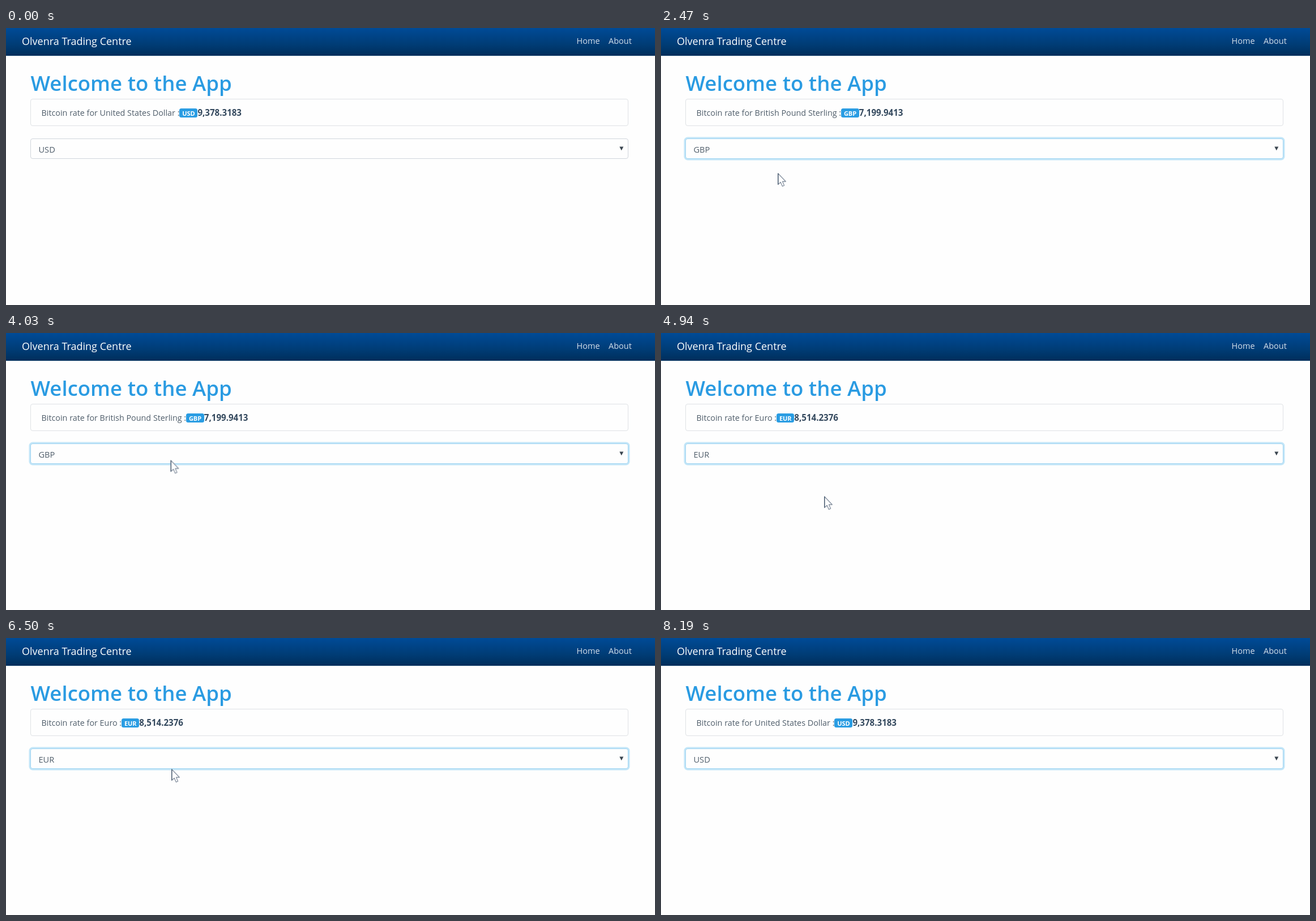
Write an HTML page that moves like this. It is 1146 by 489 pixels and loops after 8450 ms.

```html
<!DOCTYPE html>
<html lang="en">
<head>
<meta charset="utf-8">
<title>Exchange rates</title>
<style>
  html, body { margin: 0; width: 100%; height: 100%; overflow: hidden; background: #fefefe; }
  body {
    position: relative;
    font-family: "Open Sans", "Noto Sans", sans-serif;
    font-size: 14.35px;
    color: #505e6b;
    white-space: nowrap;
  }
  nav, h1, .box, .brand, .link, .rate, .code, svg { position: absolute; box-sizing: border-box; margin: 0; }

  nav {
    left: 0; top: 0; width: 100%; height: 49px;
    background: linear-gradient(#004b97, #003c75 60%, #002e5b);
    box-shadow: 0 1px #e6ebf0;
  }
  .brand, .link { top: 11px; line-height: 24px; }
  .brand { left: 28px; font-size: 18px; color: #fff; }
  .link { font-size: 14.5px; color: #d5dfea; }

  h1 { left: 43.5px; top: 77px; font-size: 36.6px; font-weight: 600; line-height: 40px; color: #2a9be2; }

  .box { left: 43px; width: 1056px; border: 1px solid #dfe2e5; border-radius: 4px; background: #fefefe; }
  .card { top: 125px; height: 48px; }
  .select { top: 195px; height: 36px; border-color: #d0d6dc; animation: focus 8450ms step-end infinite; }

  .rate { left: 62.5px; top: 140px; line-height: 20px; }
  .code { left: 57.5px; top: 204px; font-size: 14.6px; line-height: 20px; }
  .rate i {
    display: inline-block;
    padding: 1.5px 4.7px 0;
    border-radius: 3.5px;
    background: #2a9de3;
    color: #fff;
    font: bold 11px/15px "Open Sans", "Noto Sans", sans-serif;
  }
  .rate b { font-size: 15.1px; line-height: 1; color: #34495e; }

  .usd { animation: usd 8450ms step-end infinite; }
  .gbp { animation: gbp 8450ms step-end infinite; }
  .eur { animation: eur 8450ms step-end infinite; }

  .arrow { left: 1083px; top: 209px; }
  .cursor { left: 0; top: 0; animation: cursor 8450ms step-end infinite; }

  @keyframes focus {
    0% { border-color: #d0d6dc; box-shadow: none; }
    21.538%, 100% { border-color: #a0d4f1; box-shadow: 0 0 0 2.5px #c3e6f8; }
  }
  @keyframes usd {
    0%, 87.692%, 100% { visibility: visible; }
    29.230% { visibility: hidden; }
  }
  @keyframes gbp {
    0%, 58.461%, 100% { visibility: hidden; }
    29.230% { visibility: visible; }
  }
  @keyframes eur {
    0%, 87.692%, 100% { visibility: hidden; }
    58.461% { visibility: visible; }
  }
  /* The pointer moves in 130 ms ticks. */
  @keyframes cursor {
    0% { transform: translate(215px, -40px); }
    16.923% { transform: translate(215px, 211px); animation-timing-function: steps(3); }
    21.538% { transform: translate(212px, 226px); }
    29.230% { transform: translate(206px, 256px); }
    32.307% { transform: translate(206px, 256px); animation-timing-function: steps(4); }
    38.461% { transform: translate(289px, 229px); }
    41.538% { transform: translate(292px, 217px); animation-timing-function: steps(5); }
    49.230% { transform: translate(290px, 226px); }
    58.461% { transform: translate(288px, 288px); }
    60% { transform: translate(288px, 287px); }
    63.076% { transform: translate(288px, 287px); animation-timing-function: steps(6); }
    72.307% { transform: translate(293px, 228px); }
    75.384% { transform: translate(293px, 230px); }
    76.923% { transform: translate(292px, 231px); }
    83.076% { transform: translate(291px, 226px); }
    87.692% { transform: translate(289px, 241px); animation-timing-function: steps(6); }
    96.923%, 100% { transform: translate(300px, 500px); }
  }
</style>
</head>
<body>
  <nav>
    <span class="brand">Olvenra Trading Centre</span>
    <span class="link" style="left:1007.5px">Home</span>
    <span class="link" style="left:1064px">About</span>
  </nav>

  <h1>Welcome to the App</h1>

  <div class="box card"></div>
  <div class="box select"></div>

  <div class="usd">
    <div class="rate">Bitcoin rate for United States Dollar :<i>USD</i><b>9,378.3183</b></div>
    <div class="code">USD</div>
  </div>
  <div class="gbp">
    <div class="rate">Bitcoin rate for British Pound Sterling :<i>GBP</i><b>7,199.9413</b></div>
    <div class="code">GBP</div>
  </div>
  <div class="eur">
    <div class="rate">Bitcoin rate for Euro :<i>EUR</i><b>8,514.2376</b></div>
    <div class="code">EUR</div>
  </div>

  <svg class="arrow" width="8" height="8"><path d="M.3 .6H7.3L3.8 7.2Z" fill="#3b4650"/></svg>

  <svg class="cursor" width="16" height="25" fill="none" stroke-width="1.3">
    <path d="M.7 .8V20.3L5.2 16.2L8.4 23.4L11.6 22L8.5 15H14.3Z" fill="#fff" stroke="#8792a1" stroke-linejoin="round"/>
    <path d="M.7 .8V20.3" stroke="#42546b"/>
  </svg>
</body>
</html>
```
